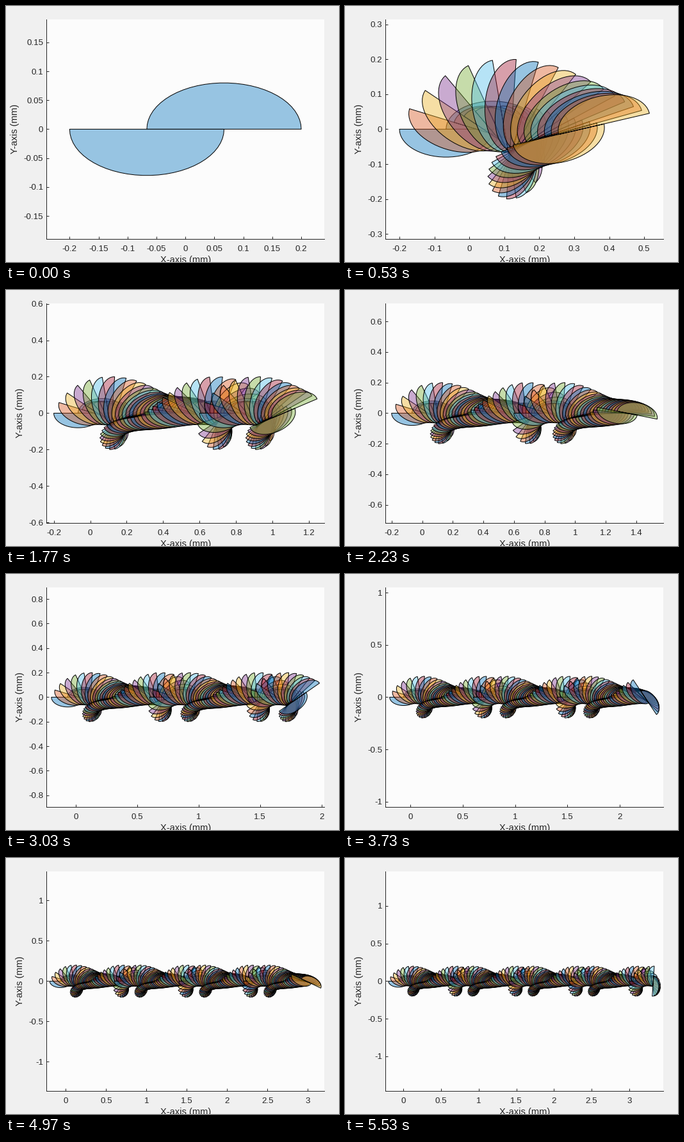
Animation of 520x400 px, one loop 5560 ms. Source, as a matplotlib script:

```python
import numpy as np
import matplotlib.pyplot as plt
from matplotlib.animation import FuncAnimation
from matplotlib.collections import PolyCollection

W, H, DPI = 520, 400, 100
PX = 72 / DPI                      # points per pixel
LOOP_MS, TICK_MS, POSE_MS = 5560, 20, 100 / 3
POSES = 167
LEFT, BOTTOM, AX_W, AX_H = 63.2, 36.4, 434, 342.3
MARGIN, SPEED, PERIOD = 0.04, 0.02, 40
INK = "#262626"
ALPHA = 0.4
COLORS = ["#0072bd", "#d95319", "#edb120", "#7e2f8e",
          "#77ac30", "#4dbeee", "#a2142f"]

plt.rcParams["font.family"] = "Liberation Sans"
plt.rcParams["axes.unicode_minus"] = False


def body():
    """Two half ellipses, overlapping along a shared straight edge."""
    a, b, c = 0.4 / 3, 0.08, 0.2 / 3
    t = np.linspace(0, np.pi, 32)
    lower = np.column_stack([-c - a * np.cos(t), -b * np.sin(t)])
    upper = np.column_stack([c - a * np.cos(t), b * np.sin(t)])
    return np.vstack([lower, upper])


def poses():
    """Steady drift with a clockwise turn of pulsing speed."""
    step = 2 * np.pi / PERIOD
    k = np.arange(POSES)
    turn = step * (1 + 0.9 * np.cos(step * k))
    turn[0] = 0
    x, y = body().T
    shapes = []
    for n, th in enumerate(np.cumsum(turn)):
        c, s = np.cos(th), np.sin(th)
        shapes.append(np.column_stack([SPEED * n + c * x + s * y, c * y - s * x]))
    return shapes


def ticks(lo, hi):
    step = next(s for s in (0.05, 0.1, 0.2, 0.5, 1) if (hi - lo) / s <= 10)
    vals = np.arange(np.ceil(lo / step), np.floor(hi / step) + 1) * step
    return step, vals, [f"{round(v, 2) + 0.0:g}" for v in vals]


shapes = poses()
reach = np.maximum.accumulate([s[:, 0].max() for s in shapes])

fig = plt.figure(figsize=(W / DPI, H / DPI), dpi=DPI, facecolor="#f0f0f0")
ax = fig.add_axes([LEFT / W, BOTTOM / H, AX_W / W, AX_H / H], facecolor="#fcfcfc")
ax.spines[["top", "right"]].set_visible(False)
for side in ("left", "bottom"):
    ax.spines[side].set(color=INK, linewidth=PX)
ax.tick_params(direction="in", length=4 * PX, width=PX, color=INK,
               labelcolor=INK, labelsize=13.33 * PX)
ax.tick_params(axis="x", pad=10 * PX)
ax.tick_params(axis="y", pad=5 * PX)

label = dict(color=INK, fontsize=14.67 * PX, ha="center")
fig.text(281 / W, -1.5 / H, "X-axis (mm)", va="baseline", **label)
ylabel = fig.text(0, (BOTTOM + AX_H / 2) / H, "Y-axis (mm)",
                  va="center", rotation=90, **label)

trail = PolyCollection([], edgecolors="black", linewidths=PX,
                       facecolors=[(c, ALPHA) for c in COLORS])
ax.add_collection(trail, autolim=False)


def update(frame):
    n = int((frame + 0.75) * TICK_MS / POSE_MS)
    trail.set_verts(shapes[:n + 1])
    x0, x1 = -0.2 - MARGIN, reach[n] + MARGIN
    top = (x1 - x0) * AX_H / AX_W / 2
    _, xs, xt = ticks(x0, x1)
    step, ys, yt = ticks(-top, top)
    ax.set_xticks(xs, xt)
    ax.set_yticks(ys, yt)
    ax.set_xlim(x0, x1)
    ax.set_ylim(-top, top)
    ylabel.set_x((14.5 if step < 0.1 else 22.5) / W)
    return trail, ylabel


anim = FuncAnimation(fig, update, frames=LOOP_MS // TICK_MS,
                     init_func=lambda: update(0), interval=TICK_MS,
                     repeat=True, repeat_delay=0)
plt.show()
```
